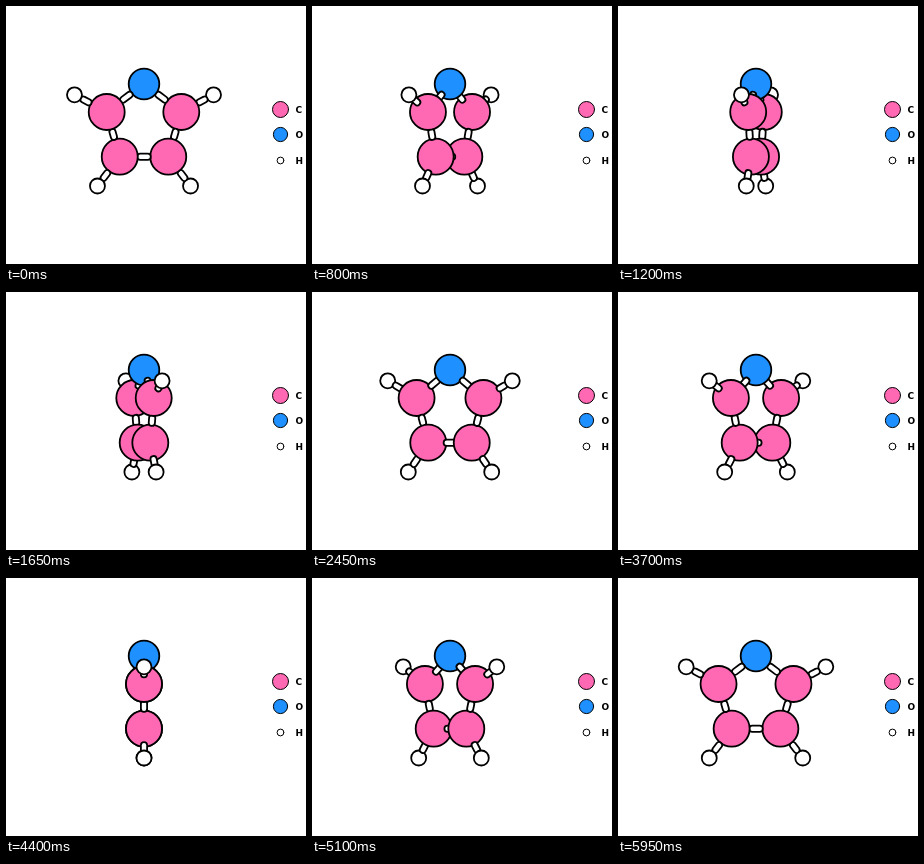
An HTML page with a canvas for the animation above (6 s loop, 300 by 258 pixels).

```html
<!DOCTYPE html>
<html lang="en">
<head>
<meta charset="utf-8">
<title>Rotating molecule</title>
<style>
  html, body { margin: 0; width: 100%; height: 100%; overflow: hidden; background: #fff; }
  canvas { display: block; }
</style>
</head>
<body>
<canvas width="300" height="258"></canvas>
<script>
const ctx = document.querySelector('canvas').getContext('2d');
const AXIS = 138, LOOP = 6000, STEP = 50, START_DEG = 6, INSET = 2.7;

const KINDS = {
  C: { r: 18, color: '#ff69b4' },
  O: { r: 15.3, color: '#1e90ff' },
  H: { r: 7.5, color: '#fff' }
};

// Flat molecule: kind, distance from the vertical axis, height
const ATOMS = [
  ['O', 0, 78],
  ['C', 37.5, 106], ['C', 24.4, 150.7], ['C', -24.4, 150.7], ['C', -37.5, 106],
  ['H', 69.9, 88.8], ['H', 46.8, 180], ['H', -46.8, 180], ['H', -69.9, 88.8]
].map(([kind, x, y]) => ({ ...KINDS[kind], x, y }));

const BONDS = [
  [0, 1], [1, 2], [2, 3], [3, 4], [4, 0],
  [1, 5], [2, 6], [3, 7], [4, 8]
].map(([i, j]) => makeBond(ATOMS[i], ATOMS[j]));

const LEGEND = [['C', 8, 103.5], ['O', 7.1, 128.5], ['H', 3.4, 154.5]];

// A bond spans the gap between the two atom surfaces
function makeBond(a, b) {
  const length = Math.hypot(b.x - a.x, b.y - a.y);
  const along = d => ({
    x: a.x + (b.x - a.x) * d / length,
    y: a.y + (b.y - a.y) * d / length
  });
  return {
    from: along(a.r + INSET),
    to: along(length - b.r - INSET),
    x: (a.x + b.x) / 2
  };
}

function disc(x, y, r, color, line) {
  ctx.beginPath();
  ctx.arc(x, y, r, 0, 2 * Math.PI);
  ctx.fillStyle = color;
  ctx.fill();
  ctx.strokeStyle = '#000';
  ctx.lineWidth = line;
  ctx.stroke();
}

function capsule(x1, y1, x2, y2) {
  ctx.lineCap = 'round';
  for (const [color, width] of [['#000', 8], ['#fff', 4.4]]) {
    ctx.beginPath();
    ctx.moveTo(x1, y1);
    ctx.lineTo(x2, y2);
    ctx.strokeStyle = color;
    ctx.lineWidth = width;
    ctx.stroke();
  }
}

function drawLegend() {
  ctx.font = 'bold 9px "DejaVu Sans", sans-serif';
  for (const [label, r, y] of LEGEND) {
    disc(274.5, y, r, KINDS[label].color, 1);
    ctx.fillStyle = '#000';
    ctx.fillText(label, 289.5, y + 3.2);
  }
}

function draw(time) {
  const step = Math.floor(time % LOOP / STEP);
  const angle = (START_DEG + step * STEP / LOOP * 360) * Math.PI / 180;
  const cos = Math.cos(angle), sin = Math.sin(angle);
  const px = x => AXIS + x * cos;

  ctx.fillStyle = '#fff';
  ctx.fillRect(0, 0, 300, 258);
  drawLegend();

  // Far parts first
  const parts = [...ATOMS, ...BONDS].sort((a, b) => (b.x - a.x) * sin);
  for (const p of parts) {
    if (p.from) capsule(px(p.from.x), p.from.y, px(p.to.x), p.to.y);
    else disc(px(p.x), p.y, p.r, p.color, 1.8);
  }
}

const start = performance.now();
function tick() {
  draw(performance.now() - start);
  requestAnimationFrame(tick);
}
tick();
</script>
</body>
</html>
```
